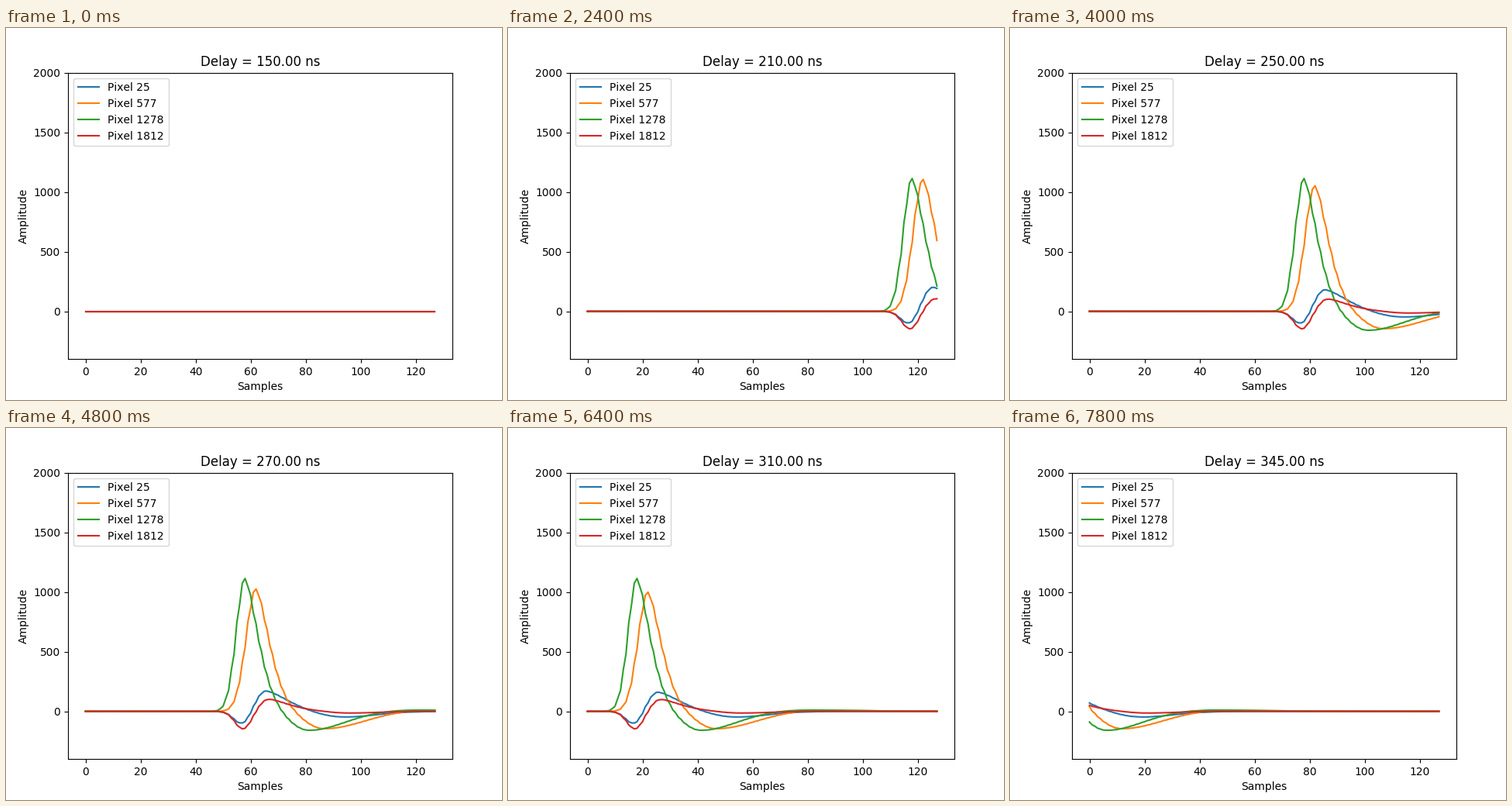
Recreate the animation shown at these times as a matplotlib script. Size 640 by 480 pixels, loop 8 s.

```python
import numpy as np
import matplotlib.pyplot as plt
from matplotlib.animation import FuncAnimation

FRAMES = 40
STEP_MS = 200
REF_DELAY = 310    # delay at which the lobe centres are given
SKEW = 0.13        # odd samples are taken slightly late, even ones early

# label, early boost of the positive lobes, lobes as (height, centre, rise, fall)
PIXELS = [
    ("Pixel 25", 0.19, [(-108, 17, 4.3, 4), (162, 25.5, 5, 11.4), (-50, 53, 13, 17)]),
    ("Pixel 577", 0.08, [(1000, 22, 5.1, 7), (-146, 46.5, 10, 20), (12, 80, 14, 25)]),
    ("Pixel 1278", 0, [(1115, 18, 4.5, 6.85), (-160, 41, 9.9, 18), (12, 78, 14, 25)]),
    ("Pixel 1812", 0.05, [(-150, 17.3, 4.2, 4.3), (101, 26.5, 5, 10.5), (-15, 55, 9, 15)]),
]

# kerning grid that gives whole-pixel letter spacing
plt.rcParams["text.kerning_factor"] = 6

samples = np.arange(128)
skewed = samples + np.where(samples % 2, SKEW, -SKEW)


def lobe(t, height, centre, rise, fall):
    """Gaussian rise; positive lobes fall with a longer tail."""
    d = t - centre
    power = np.where((d > 0) & (height > 0), 1.55, 2)
    return height * np.exp(-np.abs(d / np.where(d > 0, fall, rise)) ** power)


def signal(boost, lobes, delay):
    gain = 1 + boost * max(0, (290 - delay) / 60)
    t = skewed + delay - REF_DELAY
    return sum(lobe(t, h * gain if h > 0 else h, *shape) for h, *shape in lobes)


fig, ax = plt.subplots(figsize=(6.4, 4.8), dpi=100)
lines = [ax.plot(samples, 0 * samples, label=name)[0] for name, _, _ in PIXELS]
ax.set_ylim(-400, 2000)
ax.set_xlabel("Samples")
ax.set_ylabel("Amplitude")
ax.legend(loc="upper left")
title = ax.set_title("")


def draw(frame):
    delay = 150 + 5 * frame
    title.set_text(f"Delay = {delay:.2f} ns")
    for line, (_, boost, lobes) in zip(lines, PIXELS):
        line.set_ydata(signal(boost, lobes, delay))
    return [*lines, title]


def init():
    return draw(0)


anim = FuncAnimation(fig, draw, frames=FRAMES, init_func=init,
                     interval=STEP_MS, repeat=True, repeat_delay=0)
plt.show()
```
